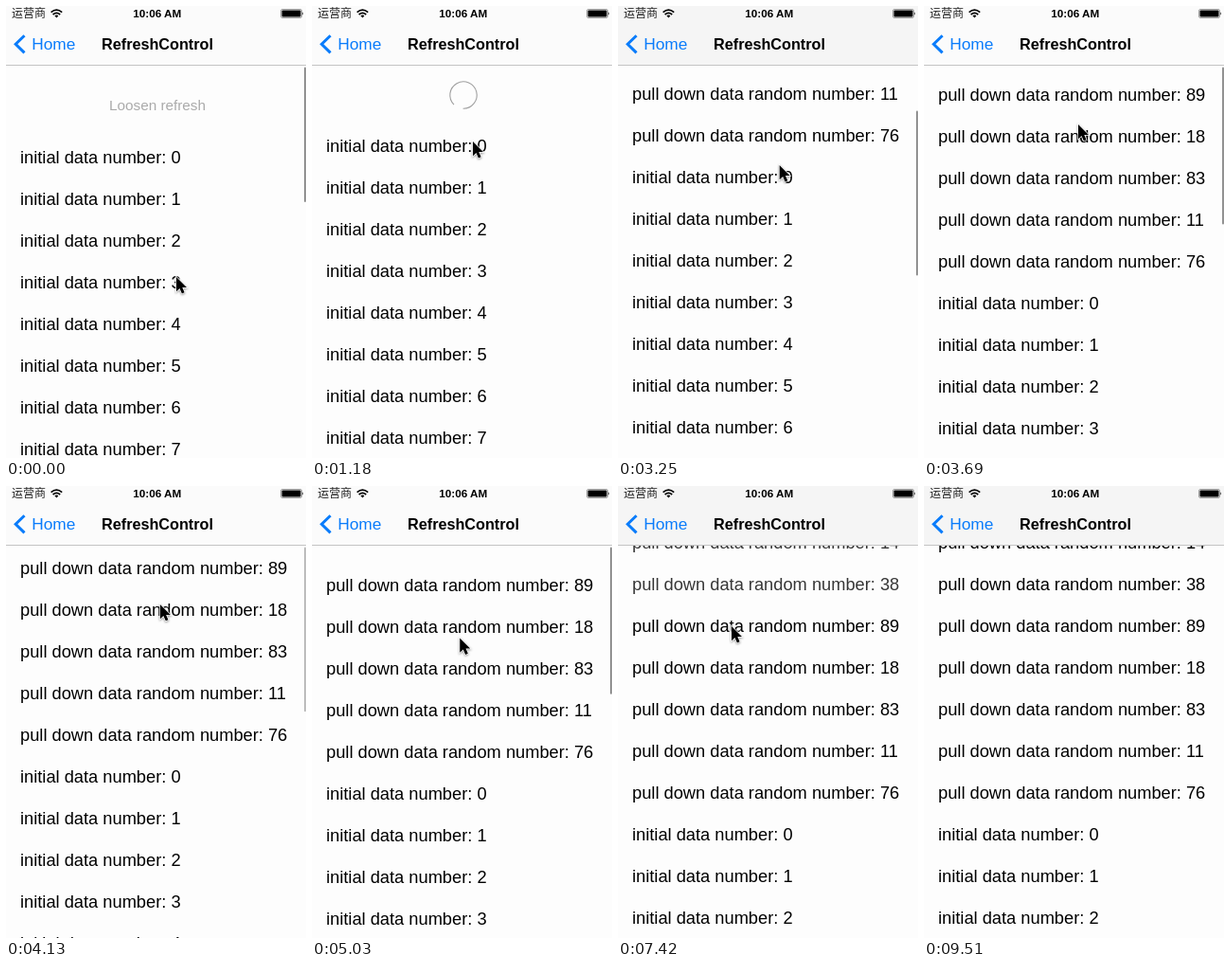
An HTML page for the animation above (9940 ms loop, 317 by 477 pixels).

```html
<!DOCTYPE html>
<html lang="en">
<head>
<meta charset="utf-8">
<title>Pull to refresh</title>
<style>
  html, body { margin: 0; width: 100%; height: 100%; overflow: hidden; background: #fdfdfd; }
  svg { display: block; font-family: "Liberation Sans", Arial, sans-serif; }
  .row { font-size: 18.27px; }
  #cursor { paint-order: stroke; filter: drop-shadow(0 1px 1px #0006); }
</style>
</head>
<body>
<svg width="317" height="477" viewBox="0 0 317 477">
  <defs><clipPath id="listArea"><rect y="63" width="317" height="414"/></clipPath></defs>
  <rect width="317" height="477" fill="#fdfdfd"/>
  <g clip-path="url(#listArea)">
    <text id="label" x="160" text-anchor="middle" font-size="15.3" fill="#aaa"></text>
    <path id="spinner" fill="none" stroke="#a0a0a0" stroke-width="1.1"/>
    <g id="rows"></g>
    <rect id="bar" x="315" width="2" rx="1" fill="#929292"/>
  </g>
  <rect id="nav" width="317" height="63"/>
  <rect y="62" width="317" height="1" fill="#c4c4c4"/>
  <text x="6" y="12.4" font-size="12" fill="#222" style="font-family:'Noto Sans CJK SC','Noto Sans CJK',sans-serif">运营商</text>
  <g fill="none" stroke="#000" stroke-width="1.7">
    <path d="M47.6 6.6Q53.4 1.8 59.2 6.6M49.6 9Q53.4 5.9 57.2 9"/>
    <path d="M51.4 10.2Q53.4 8.6 55.4 10.2L53.4 12.4Z" fill="#000" stroke="none"/>
  </g>
  <text x="159.8" y="12.2" text-anchor="middle" font-size="11.7" font-weight="700">10:06 AM</text>
  <rect x="290.5" y="3.5" width="22" height="9" rx="1.6" fill="none" stroke="#777" stroke-width=".7"/>
  <rect x="291.5" y="4.5" width="20" height="7" rx="1"/>
  <path d="M313.4 6.2q1.6 1.8 0 3.6z"/>
  <path d="M19.5 31.2L10.2 40.3L19.5 49.4" fill="none" stroke="#0a7cfb" stroke-width="3"/>
  <text x="27.2" y="46" font-size="17.3" fill="#0a7cfb">Home</text>
  <text x="160" y="46" text-anchor="middle" font-size="16.2" font-weight="700">RefreshControl</text>
  <path id="cursor" d="M0 0V15.2L3.5 12L5.9 17.4L8.6 16.2L6.3 11H11Z" stroke="#fff" stroke-width="1.4"/>
</svg>
<script>
const LOOP = 9940, STEP = 148, ROW = 44, NAV = 64, HEADER = 62;
const PULL = 75, PULL_TIME = 592;
const FLING_START = 2955, FLING_TIME = 760, FLING = 166, REBOUND = 8;
const refreshes = [
  { press: -580, release: 304, done: 1628 },
  { press: 4884, release: 5780, done: 6968 }
];
const numbers = [76, 11, 83, 18, 89, 38, 14];
const BATCH = 5;

// The pointer glides from one place to the next.
const glides = [
  { start: 0, end: 148, x: 180, y: 288 },
  { start: 304, end: 1184, x: 170, y: 143 },
  { start: FLING_START, end: 3400, x: 171, y: 180 },
  { start: 3400, end: 3700, x: 163, y: 125 },
  { start: 3990, end: 4290, x: 156, y: 123 },
  { start: 4884, end: 5476, x: 157, y: 123 + 2 * PULL },
  { start: 5780, end: 5920, x: 160, y: 121 },
  { start: 5920, end: 6800, x: 120, y: 148 },
  { start: 9028, end: 9400, x: 250, y: 490 }
];

const $ = id => document.getElementById(id);
const clamp = v => Math.max(0, Math.min(1, v));
const progress = (t, start, length) => clamp((t - start) / length);
const easeOut = p => 1 - (1 - p) ** 4;
const easeInOut = p => p < 0.5 ? 8 * p ** 4 : 1 - 8 * (1 - p) ** 4;

function addRow(text, index) {
  const el = document.createElementNS("http://www.w3.org/2000/svg", "text");
  el.setAttribute("class", "row");
  el.setAttribute("x", 15);
  el.setAttribute("y", index * ROW + 28.3);
  el.textContent = text;
  $("rows").append(el);
  return el;
}
for (let i = 0; i < 10; i++) addRow("initial data number: " + i, i);
const addedRows = numbers.map((n, i) => addRow("pull down data random number: " + n, -1 - i));

// A pull stretches the list, then it settles at the header's height.
function stretch(t, { press, release }) {
  const pulled = PULL * progress(t, press, PULL_TIME);
  return pulled + (HEADER - PULL) * easeOut(progress(t, release, 300));
}

function flung(t) {
  const back = progress(t, FLING_START + FLING_TIME, 500);
  return FLING * easeInOut(progress(t, FLING_START, FLING_TIME)) - REBOUND * easeOut(back);
}

function pointerAt(t) {
  let x = 180, y = 286;
  for (const g of glides) {
    const p = progress(t, g.start, g.end - g.start);
    x += (g.x - x) * p;
    y += (g.y - y) * p;
  }
  return `${x} ${y}`;
}

function arc(cy, from, sweep) {
  const point = deg => {
    const a = deg * Math.PI / 180;
    return `${160 + 14.2 * Math.cos(a)} ${cy + 14.2 * Math.sin(a)}`;
  };
  return `M${point(from)}A14.2 14.2 0 ${sweep > 180 ? 1 : 0} 1 ${point(from + sweep)}`;
}

function drawHeader(t, top) {
  const load = refreshes.find(r => t >= r.release && t < r.done + 2 * STEP);
  $("label").style.display = load || top <= NAV ? "none" : "";
  $("label").textContent = top >= NAV + HEADER ? "Loosen refresh" : "Pull down refresh";
  $("label").setAttribute("y", top - 27);
  $("spinner").style.display = load ? "" : "none";
  if (!load) return;
  const age = t - load.release;
  const from = 115 + age * 0.0225 + Math.max(0, age - 900) * 0.34;
  const cy = t < load.done ? top - 32 : NAV + 30;
  $("spinner").setAttribute("d", arc(cy, from, Math.min(330, age * 0.36)));
  $("spinner").setAttribute("opacity", 1 - progress(t, load.done - STEP, 3 * STEP));
}

function drawBar(t, top, added) {
  const loading = refreshes.some(r => t >= r.release && t < r.done);
  const inset = loading ? HEADER : 0;
  const over = Math.max(0, top - NAV - inset);
  const touches = refreshes.map(r => [r.press, r.release + STEP]);
  touches.push([FLING_START, FLING_START + 900]);
  const alpha = touches.map(([start, end]) => t < start ? 0 : 1 - progress(t, end, 350));
  $("bar").setAttribute("y", 64.5 + Math.max(0, NAV - top) * 0.368);
  $("bar").setAttribute("height", (added ? 174 : 216) - over - inset * 0.14);
  $("bar").setAttribute("opacity", Math.max(...alpha));
}

function render(time) {
  const t = Math.floor((time % LOOP + 12) / STEP) * STEP;
  const firstRow = NAV + flung(t) + refreshes.reduce((sum, r) => sum + stretch(t, r), 0);
  const added = BATCH * refreshes.filter(r => t >= r.done).length;
  const top = firstRow - added * ROW;

  $("rows").setAttribute("transform", `translate(0 ${firstRow})`);
  addedRows.forEach((el, i) => {
    const { done } = refreshes[Math.floor(i / BATCH)];
    el.setAttribute("opacity", t < done ? 0 : progress(t, done - STEP, 5 * STEP));
  });
  drawHeader(t, top);
  drawBar(t, top, added);
  $("nav").setAttribute("fill", top < NAV ? "#f5f5f5" : "#fbfbfb");
  $("cursor").setAttribute("transform", `translate(${pointerAt(t)})`);
}

const began = performance.now();
function tick() {
  render(performance.now() - began);
  requestAnimationFrame(tick);
}
tick();
</script>
</body>
</html>
```
